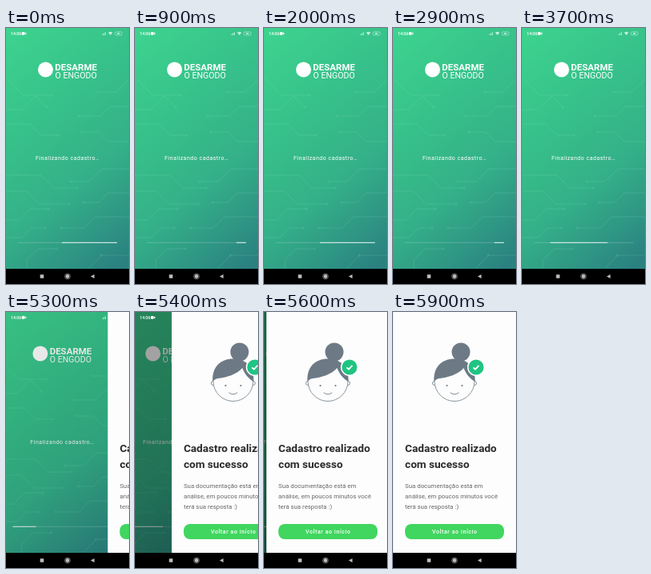
An HTML page for the animation above (7000 ms loop, 154x320 px).

```html
<!DOCTYPE html>
<html lang="pt">
<head>
<meta charset="utf-8">
<title>Finalizando cadastro</title>
<style>
  html, body { margin: 0; width: 100%; height: 100%; overflow: hidden; background: #000; }
  svg { display: block; width: 100%; height: 100%; }
  text { font-family: Roboto, "Noto Sans", sans-serif; white-space: pre; }
</style>
</head>
<body>
<svg viewBox="0 0 154 320">
  <defs>
    <linearGradient id="green" gradientUnits="userSpaceOnUse" x1="0" y1="0" x2="200" y2="250">
      <stop offset="0" stop-color="#3dd48f"/>
      <stop offset="0.35" stop-color="#37c18a"/>
      <stop offset="0.65" stop-color="#34b088"/>
      <stop offset="0.85" stop-color="#2f9684"/>
      <stop offset="1" stop-color="#2a8180"/>
    </linearGradient>
    <clipPath id="barClip"><rect x="15" y="266" width="124" height="4"/></clipPath>
  </defs>

  <g id="loading">
    <rect width="154" height="302" fill="url(#green)"/>
    <g id="circuit" fill="none" stroke="#a4ecd0" stroke-opacity="0.26" stroke-width="0.6"/>
    <circle cx="49.500" cy="52" r="9.5" fill="#fff"/>
    <g fill="#fff">
      <text x="61.3" y="53" font-size="11.5" font-weight="700">DESARME</text>
      <text x="61.5" y="63" font-size="10.6">O ENGODO</text>
      <text x="37" y="165" font-size="7" letter-spacing="0.5">Finalizando cadastro…</text>
    </g>
    <g clip-path="url(#barClip)" fill="#fff">
      <rect x="15" y="267.8" width="124" height="1" opacity="0.2"/>
      <rect id="bar1" y="267.8" height="1" opacity="0.85"/>
      <rect id="bar2" y="267.8" height="1" opacity="0.85"/>
    </g>
  </g>
  <rect id="dim" width="154" height="302"/>

  <g id="done">
    <rect width="154" height="302" fill="#fdfdfd"/>
    <g stroke="#6d7a86" stroke-width="0.8" fill="#fdfdfd">
      <circle cx="52" cy="89" r="2.6"/>
      <circle cx="102" cy="89" r="2.6"/>
      <circle cx="77" cy="86.5" r="25"/>
    </g>
    <g fill="#6d7a86">
      <circle cx="85" cy="50" r="11.5"/>
      <path d="M51.5 87C50 69 61 58.5 77 58.5S104 69 102.5 87C96 83 91 77 88.5 70C82 78 68 82 58 83C55 83.5 53 85 51.5 87Z"/>
      <circle cx="67.5" cy="92" r="1.1"/>
      <circle cx="86.5" cy="92" r="1.1"/>
    </g>
    <path d="M72 101Q77 105 82 101" fill="none" stroke="#6d7a86" stroke-width="0.9" stroke-linecap="round"/>
    <circle cx="104" cy="69" r="10.3" fill="#1fc482" stroke="#fff" stroke-width="1.5"/>
    <path d="M100.5 69.3L103 71.7L107.5 66.8" fill="none" stroke="#fff" stroke-width="1.8"/>
    <g font-size="13.6" font-weight="700" fill="#29292b">
      <text x="15" y="175">Cadastro realizado</text>
      <text x="15" y="195">com sucesso</text>
    </g>
    <g font-size="7.85" fill="#666">
      <text x="15" y="219.5">Sua documentação está em</text>
      <text x="15" y="232.7">análise, em poucos minutos você</text>
      <text x="15" y="246">terá sua resposta :)</text>
    </g>
    <rect x="15" y="265" width="124" height="19" rx="8" fill="#40d65f"/>
    <text x="49" y="277.3" font-size="7" font-weight="500" letter-spacing="0.6" fill="#fff">Voltar ao início</text>
  </g>

  <g fill="#fff">
    <text x="6" y="9" font-size="5.2" font-weight="500">14:06</text>
    <rect x="19.8" y="5" width="3.6" height="3.8" rx="0.8"/>
    <path d="M23.2 6.9L25.2 5.2V8.6Z"/>
    <g opacity="0.7">
      <path d="M120.5 9V7.4H121.5V9ZM122.2 9V6.4H123.2V9ZM123.9 9V5.2H124.9V9Z"/>
      <path d="M128 5.8Q130.7 3.5 133.4 5.8L130.7 9Z"/>
      <rect x="136.4" y="4.8" width="8.8" height="4.2" rx="1.5" fill="none" stroke="#fff" stroke-width="0.6"/>
      <rect x="139" y="6.1" width="3.4" height="1.6"/>
    </g>
  </g>
  <rect y="301" width="154" height="19"/>
  <g fill="#bdbdbd">
    <rect x="42.7" y="308.2" width="4.6" height="4.6" rx="0.4"/>
    <circle cx="77" cy="310.5" r="2.4"/>
    <circle cx="77" cy="310.5" r="3.4" fill="none" stroke="#bdbdbd" stroke-width="0.6"/>
    <path d="M106 310.5L110.6 307.9V313.1Z"/>
  </g>
</svg>
<script>
const LOOP = 7000, W = 154;
const BAR_X = 15, BAR_W = 124, BAR_PERIOD = 2000, BAR_PHASE = 0.468;
const SLIDE_AT = 5257, SLIDE_RATE = 0.017;
const $ = id => document.getElementById(id);

// Traces that end in a dot
const traces = [
  ["M0 62L22 84H36L50 98", 51, 99], ["M0 102H20L38 84H56", 57, 84],
  ["M154 64L138 80H116", 115, 80], ["M154 98H130L118 110H92", 91, 110],
  ["M0 120H30L44 134H64", 65, 134], ["M154 142H128L116 130H96", 95, 130],
  ["M0 184H44L60 200H88", 89, 200], ["M154 176H120L104 192H82", 81, 192],
  ["M0 204H26L42 220H78", 79, 220], ["M154 206H128L116 218H98", 97, 218],
  ["M0 240H16L30 226H52", 53, 226], ["M154 236H112L98 250H70", 69, 250],
  ["M0 262H20L32 250H48", 49, 250], ["M26 302V290L40 276H62", 63, 276],
  ["M154 284H120L104 300", 119, 284]
];
$("circuit").innerHTML = traces.map(([d, x, y]) =>
  `<path d="${d}"/><circle cx="${x}" cy="${y}" r="1.1"/>`).join("");

function bezier(x, x1, y1, x2, y2) {
  const at = (s, a, b) => 3 * (1 - s) ** 2 * s * a + 3 * (1 - s) * s * s * b + s ** 3;
  let lo = 0, hi = 1;
  for (let i = 0; i < 24; i++) {
    const mid = (lo + hi) / 2;
    if (at(mid, x1, x2) < x) lo = mid; else hi = mid;
  }
  return at(lo, y1, y2);
}

// Key: [time, value, ...curve leading to it]
function track(keys, p) {
  const i = Math.max(1, keys.findIndex(k => p <= k[0]));
  const [t0, v0] = keys[i - 1], [t1, v1, ...curve] = keys[i];
  return v0 + (v1 - v0) * bezier((p - t0) / (t1 - t0), ...curve);
}

const line = [0.3, 0.3, 0.7, 0.7];
const bars = [
  {
    el: $("bar1"),
    center: [[0, -0.9517], [0.2, -0.9517, ...line],
      [0.5915, -0.115, 0.5, 0, 0.7017, 0.4958],
      [1, 1.0544, 0.3024, 0.3814, 0.55, 0.9564]],
    width: [[0, 0.08], [0.3665, 0.08, ...line],
      [0.6833, 0.6615, 0.335, 0.125, 0.786, 1],
      [1, 0.08, 0.225, 0, 0.234, 0.629]]
  },
  {
    el: $("bar2"),
    center: [[0, -0.0489],
      [0.25, 0.3276, 0.15, 0, 0.5151, 0.4097],
      [0.4835, 0.795, 0.3103, 0.2841, 0.8, 0.7337],
      [1, 1.674, 0.4, 0.627, 0.6, 0.902]],
    width: [[0, 0.08],
      [0.1915, 0.45, 0.205, 0.0571, 0.5766, 0.454],
      [0.4415, 0.64, 0.1523, 0.1964, 0.6484, 1],
      [1, 0.08, 0.2578, 0, 0.2118, 1.38]]
  }
];

function draw(t) {
  const p = (t / BAR_PERIOD + BAR_PHASE) % 1;
  for (const { el, center, width } of bars) {
    const w = track(width, p);
    el.setAttribute("x", BAR_X + BAR_W * (track(center, p) - w / 2));
    el.setAttribute("width", BAR_W * w);
  }
  // Critically damped spring
  const k = Math.max(0, t - SLIDE_AT) * SLIDE_RATE;
  const left = (1 + k) * Math.exp(-k);
  $("loading").setAttribute("transform", `translate(${-W / 4 * (1 - left)})`);
  $("done").setAttribute("transform", `translate(${W * left})`);
  $("dim").setAttribute("opacity", 0.52 * (1 - left));
}

const start = performance.now();
function tick() {
  draw((performance.now() - start) % LOOP);
  requestAnimationFrame(tick);
}
tick();
</script>
</body>
</html>
```
